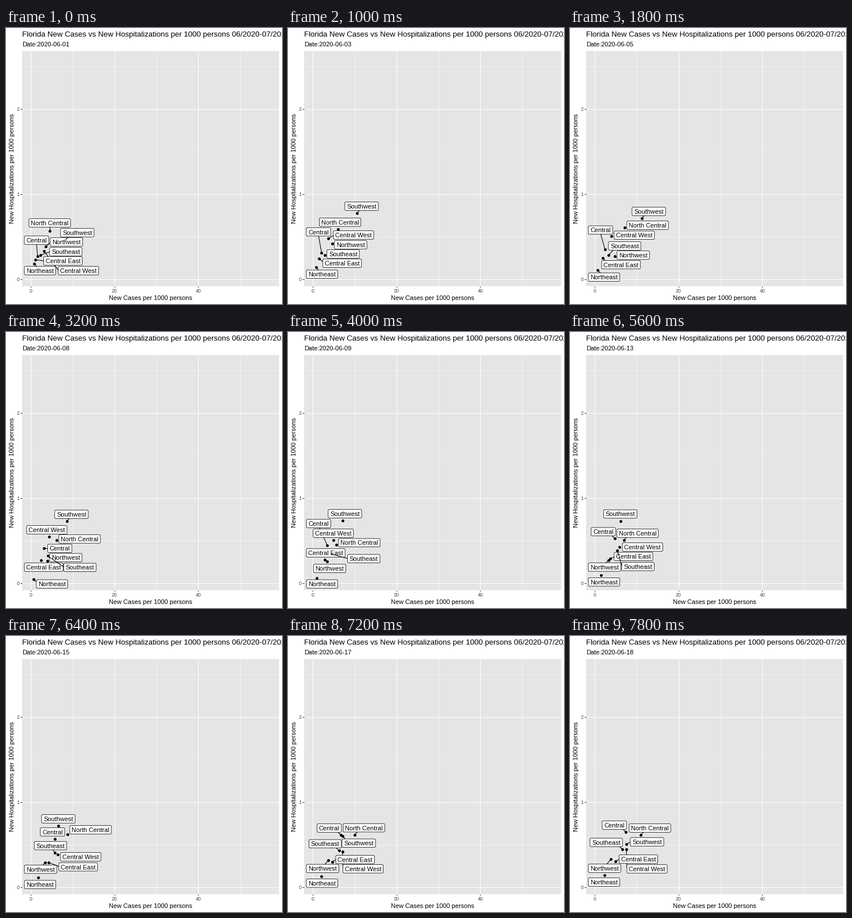
A matplotlib script that plays this animation: 480 by 480 pixels, repeating every 8 s.

```python
import matplotlib.pyplot as plt
import numpy as np
from matplotlib.animation import FuncAnimation
from matplotlib.patches import FancyBboxPatch, Rectangle

plt.rcParams["font.family"] = ["Liberation Sans", "DejaVu Sans"]

SIZE, DPI = 480, 72          # at 72 dpi one point is one pixel
FRAMES, INTERVAL = 40, 200
LEFT, RIGHT, TOP, BOTTOM = 28, 474.5, 39.5, 448.5
BOX_H, PAD, MIN_SEGMENT = 14.6, 3.3, 6

# Turning points of each dot: (step, x, y); it moves straight between them.
PATHS = {
    "Northwest": [(0, 69, 380), (5, 77, 375), (9, 78, 397), (24, 65, 400),
                  (39, 71, 388)],
    "North Central": [(0, 76, 353), (9, 95, 347), (24, 80, 379), (32, 107, 345),
                      (39, 123, 346)],
    "Northeast": [(0, 49, 410), (16, 48, 430), (39, 60, 416)],
    "Central": [(0, 55, 397), (24, 71, 366), (39, 97, 341)],
    "Southwest": [(0, 104, 368), (5, 120, 322), (9, 125, 331), (24, 84, 327),
                  (32, 91, 330), (39, 98, 362)],
    "Central West": [(0, 66, 388), (5, 70, 366), (16, 75, 356), (32, 90, 380),
                     (39, 98, 371)],
    "Central East": [(0, 51, 403), (16, 61, 397), (39, 79, 392)],
    "Southeast": [(0, 60, 395), (9, 67, 395), (39, 91, 371)],
}

# Label centres to try, relative to the dot.
SHIFTS = np.stack(np.meshgrid(np.arange(-100, 101, 4), np.arange(-60, 61, 2)),
                  axis=-1).reshape(-1, 2)

fig = plt.figure(figsize=(SIZE / DPI, SIZE / DPI), dpi=DPI, facecolor="white")
ax = fig.add_axes([0, 0, 1, 1])
ax.set(xlim=(0, SIZE), ylim=(SIZE, 0))
ax.axis("off")


def write(x, y, text, size, **style):
    return ax.text(x, y, text, fontsize=size, **style)


def rule(xs, ys, color, width):
    ax.plot(xs, ys, color=color, lw=width, zorder=1, solid_capstyle="butt")


def draw_panel():
    ax.add_patch(Rectangle((LEFT, TOP), RIGHT - LEFT, BOTTOM - TOP,
                           fc="#E5E5E5", ec="none", zorder=0))
    for k in range(6):
        x, y = 43.3 + 72.75 * k, 437 - 74.1 * k
        major = k % 2 == 0
        width = 1.07 if major else 0.53
        rule([x, x], [TOP, BOTTOM], "white", width)
        rule([LEFT, RIGHT], [y, y], "white", width)
        if major:
            rule([x, x], [BOTTOM, BOTTOM + 2.75], "#333333", 1.07)
            rule([LEFT - 2.75, LEFT], [y, y], "#333333", 1.07)
            write(x, 460.3, str(10 * k), 8.8, ha="center", color="#4D4D4D")
            write(23.2, y + 3.2, str(k // 2), 8.8, ha="right", color="#4D4D4D")
    write(28, 15.3, "Florida New Cases vs New Hospitalizations per 1000 persons "
          "06/2020-07/2020", 13.2)
    write(251.3, 472.6, "New Cases per 1000 persons", 11, ha="center")
    write(13.6, 244, "New Hospitalizations per 1000 persons", 11, ha="center",
          va="baseline", rotation=90, rotation_mode="anchor")


def anchor(px, py, box):
    """Nearest spot on the box to the point, nudged towards the side's middle."""
    x0, y0, x1, y1 = box
    mx, my = (x0 + x1) / 2, (y0 + y1) / 2
    x, y = np.clip(px, x0, x1), np.clip(py, y0, y1)
    d = np.hypot(px - x, py - y)
    if d == 0:
        return x, y, 0
    to_mx, to_my = np.hypot(px - mx, py - y), np.hypot(px - x, py - my)
    beside, above = x != px, y != py
    if above and (not beside or to_mx < to_my):
        x += (mx - x) * d / to_mx
    else:
        y += (my - y) * d / to_my
    return x, y, np.hypot(px - x, py - y)


def inside(centres, spot, half_w, half_h):
    away = abs(centres - spot)
    return (away[:, 0] < half_w) & (away[:, 1] < half_h)


class Region:
    def __init__(self, name, z):
        self.path = np.array(PATHS[name]).T
        self.dot, = ax.plot([], [], "o", ms=4, color="black", mew=0.8, zorder=2)
        self.line, = ax.plot([], [], color="black", lw=1.07, zorder=z)
        self.text = write(0, 0, name, 11, ha="center", zorder=z + 0.2)
        renderer = fig.canvas.get_renderer()
        self.width = self.text.get_window_extent(renderer).width + 2 * PAD
        self.box = FancyBboxPatch(
            (0, 0), self.width, BOX_H, boxstyle="round,pad=0,rounding_size=1.9",
            fc="white", ec="black", lw=0.75, zorder=z + 0.1)
        ax.add_patch(self.box)

    def point(self, i):
        step, x, y = self.path
        return np.array([np.interp(i, step, x), np.interp(i, step, y)])

    def choose(self, p, others, placed):
        """Cheapest label centre: near its dot, away from neighbours, clear."""
        half_w, half_h = self.width / 2, BOX_H / 2
        centres = p + SHIFTS
        centres[:, 0] = np.maximum(centres[:, 0], 32 + half_w)
        centres[:, 1] = np.minimum(centres[:, 1], 445.5 - half_h)

        push = p - others
        push = (push / (push ** 2).sum(axis=1, keepdims=True)).sum(axis=0)
        push += 0, -0.02
        push /= np.hypot(*push)

        shift = centres - p
        reach = np.hypot(*shift.T) + 1e-6
        gap = np.hypot(*np.maximum(abs(shift) - (half_w, half_h), 0).T)
        cost = gap + 0.05 * reach - 12 * (shift @ push) / reach
        cost += 1000 * inside(centres, p, half_w + 3, half_h + 3)
        for q in others:
            cost += 25 * inside(centres, q, half_w + 3, half_h + 3)
        for c, w in placed:
            cost += 200 * inside(centres, c, half_w + w / 2 + 1, BOX_H + 1)
        return centres[np.argmin(cost)]

    def place(self, p, centre):
        x0, y0 = centre - (self.width / 2, BOX_H / 2)
        ex, ey, length = anchor(*p, (x0, y0, x0 + self.width, y0 + BOX_H))
        self.dot.set_data([p[0]], [p[1]])
        self.line.set_data([p[0], ex], [p[1], ey])
        self.line.set_visible(length > MIN_SEGMENT)
        self.box.set_bounds(x0, y0, self.width, BOX_H)
        self.text.set_position((centre[0], centre[1] + 4))


draw_panel()
date = write(28, 32, "", 11)
regions = [Region(name, 3 + k) for k, name in enumerate(PATHS)]


def update(i):
    date.set_text(f"Date:2020-06-{1 + i * 4 // 9:02d}")
    points = np.array([region.point(i) for region in regions])
    spread = np.hypot(*(points - points.mean(axis=0)).T)
    placed = []
    for k in np.argsort(-spread):        # outermost labels settle first
        region, p = regions[k], points[k]
        centre = region.choose(p, np.delete(points, k, axis=0), placed)
        placed.append((centre, region.width))
        region.place(p, centre)
    return []


anim = FuncAnimation(fig, update, frames=FRAMES, interval=INTERVAL,
                     init_func=lambda: update(0), repeat=True,
                     repeat_delay=0, blit=False)
plt.show()
```
